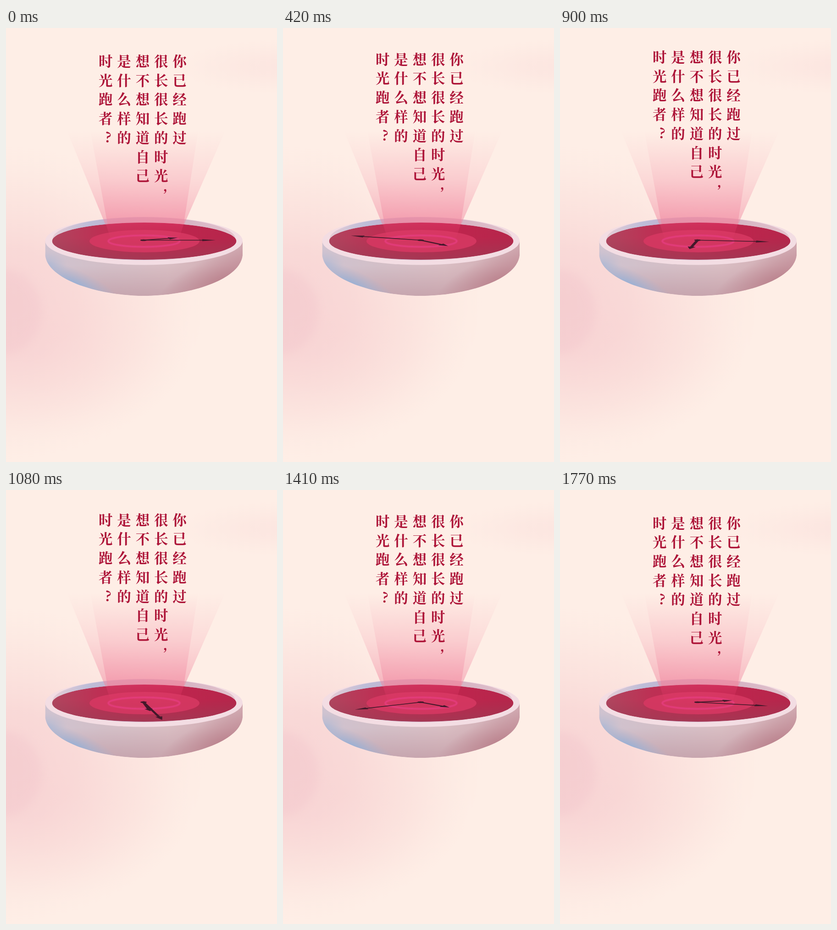
Recreate the animation shown at these times as an HTML page. Size 591 px wide and 948 px high, loop 1.8 s.

```html
<!DOCTYPE html>
<html lang="zh">
<head>
<meta charset="utf-8">
<style>
html, body { margin: 0; width: 100%; height: 100%; overflow: hidden; background: #feeee6; }
svg { display: block; width: 591px; height: 948px; }
text { font: 700 30.5px "Noto Serif CJK SC", "Noto Sans CJK SC", "Noto Sans CJK", serif; fill: #ad1438; text-anchor: middle; }
</style>
</head>
<body>
<svg viewBox="0 0 591 948">
  <defs>
    <radialGradient id="haze">
      <stop offset="0" stop-color="#f6cdd0" stop-opacity=".85"/>
      <stop offset=".35" stop-color="#f7d0d1" stop-opacity=".68"/>
      <stop offset=".7" stop-color="#f9d8d6" stop-opacity=".36"/>
      <stop offset="1" stop-color="#fbe2dd" stop-opacity="0"/>
    </radialGradient>
    <linearGradient id="body">
      <stop offset="0" stop-color="#cfc3d0"/>
      <stop offset=".3" stop-color="#d3bfc7"/>
      <stop offset=".62" stop-color="#d9bec3"/>
      <stop offset="1" stop-color="#cfa6ae"/>
    </linearGradient>
    <linearGradient id="under" x2="0" y2="1">
      <stop offset=".45" stop-color="#b88c98" stop-opacity="0"/>
      <stop offset="1" stop-color="#b88c98" stop-opacity=".5"/>
    </linearGradient>
    <radialGradient id="blue">
      <stop offset="0" stop-color="#93b0d8"/>
      <stop offset="1" stop-color="#a5b4d2" stop-opacity="0"/>
    </radialGradient>
    <radialGradient id="dusk">
      <stop offset="0" stop-color="#b57682" stop-opacity=".7"/>
      <stop offset="1" stop-color="#b57682" stop-opacity="0"/>
    </radialGradient>
    <linearGradient id="wall">
      <stop offset="0" stop-color="#e6cdd6"/>
      <stop offset=".2" stop-color="#bdbdd8"/>
      <stop offset=".4" stop-color="#c5b0ca"/>
      <stop offset=".7" stop-color="#d5b3c3"/>
      <stop offset="1" stop-color="#e3c3cd"/>
    </linearGradient>
    <linearGradient id="disc">
      <stop offset="0" stop-color="#b0465f"/>
      <stop offset=".25" stop-color="#bd3054"/>
      <stop offset=".6" stop-color="#c1254e"/>
      <stop offset="1" stop-color="#b5264b"/>
    </linearGradient>
    <linearGradient id="shade" x2="0" y2="1">
      <stop offset=".4" stop-color="#963f55" stop-opacity="0"/>
      <stop offset="1" stop-color="#963f55" stop-opacity=".65"/>
    </linearGradient>
    <linearGradient id="beam" gradientUnits="userSpaceOnUse" x1="0" y1="225" x2="0" y2="432">
      <stop offset="0" stop-color="#f7a9b5" stop-opacity="0"/>
      <stop offset=".5" stop-color="#f59fb0" stop-opacity=".24"/>
      <stop offset="1" stop-color="#f0849d" stop-opacity=".54"/>
    </linearGradient>
    <linearGradient id="pool" gradientUnits="userSpaceOnUse" x1="0" y1="420" x2="0" y2="470">
      <stop offset="0" stop-color="#e53c6c" stop-opacity=".5"/>
      <stop offset="1" stop-color="#e53c6c" stop-opacity="0"/>
    </linearGradient>
    <clipPath id="bowl"><path id="shell" d="M85.500 466V497C92 550 203 585 301 585S510 550 516 497V466Z"/></clipPath>
    <clipPath id="dial"><ellipse id="face" cx="301.500" cy="465.500" rx="201" ry="40.500"/></clipPath>
    <filter id="soft" x="-20%" y="-60%" width="140%" height="220%"><feGaussianBlur stdDeviation="1.2"/></filter>
    <filter id="blur" x="-50%" y="-50%" width="200%" height="200%"><feGaussianBlur stdDeviation="9"/></filter>
  </defs>

  <rect width="591" height="948" fill="#feeee6"/>
  <ellipse cx="0" cy="600" rx="440" ry="345" fill="url(#haze)"/>
  <ellipse cx="70" cy="715" rx="330" ry="185" fill="url(#haze)" opacity=".35"/>
  <ellipse cx="-5" cy="620" rx="82" ry="92" fill="#f3c8cd" opacity=".45" filter="url(#blur)"/>
  <ellipse cx="610" cy="85" rx="250" ry="62" fill="url(#haze)" opacity=".3"/>

  <g clip-path="url(#bowl)">
    <use href="#shell" fill="url(#body)"/>
    <use href="#shell" fill="url(#under)"/>
    <ellipse cx="150" cy="562" rx="115" ry="34" fill="url(#blue)" transform="rotate(24 150 562)"/>
    <ellipse cx="88" cy="518" rx="45" ry="32" fill="url(#blue)" opacity=".5"/>
    <ellipse cx="470" cy="552" rx="150" ry="56" fill="url(#dusk)" transform="rotate(-22 470 552)"/>
  </g>
  <ellipse cx="300.750" cy="465" rx="215.250" ry="52.500" fill="#f3dde3"/>
  <ellipse cx="301" cy="460" rx="199" ry="47" fill="url(#wall)"/>
  <path d="M133 225L217 430H388L478 225Z" fill="url(#beam)"/>
  <path d="M184 225L222 432H387L419 225Z" fill="url(#beam)"/>

  <g clip-path="url(#dial)">
    <use href="#face" fill="url(#disc)"/>
    <use href="#face" fill="url(#shade)"/>
    <ellipse cx="302" cy="465.500" rx="120" ry="24.500" fill="#d63862" opacity=".88"/>
    <path d="M216 422L228 460Q301 482 377 460L390 422Z" fill="url(#pool)"/>
    <ellipse cx="301" cy="465.500" rx="78" ry="12.500" fill="none" stroke="#e73d82" stroke-width="3" filter="url(#soft)"/>
  </g>

  <g transform="translate(300 463.500) scale(1 .255)" fill="#43182a">
    <circle r="7"/>
    <path id="long" d="M-7-3H128V-8L157 0 128 8V3H-7Z"/>
    <path id="short" d="M-6-3.500H57V-9L78 0 57 9V3.500H-6Z"/>
  </g>
  <g id="words"></g>
</svg>
<script>
const get = id => document.getElementById(id);
const [words, long, short] = ["words", "long", "short"].map(get);

function put(char, x, y) {
  const el = document.createElementNS("http://www.w3.org/2000/svg", "text");
  el.setAttribute("x", x);
  el.setAttribute("y", y);
  el.textContent = char;
  words.append(el);
}

["你已经跑过", "很长很长的时光", "想不想知道自己", "是什么样的", "时光跑者"].forEach((column, c) =>
  [...column].forEach((char, r) => put(char, 378.5 - c * 40.3, 84 + r * 41.7)));
put(",", 347, 356);
put("?", 223, 250);

// Angles are in degrees on the tilted dial, clockwise from the right.
function longAngle(f) {
  if (f < 30) return -355 * f / 30;
  return f < 45 ? 5 + 175 * (f - 30) / 15 : 12 * (60 - f);
}

function draw(now) {
  const frame = Math.floor(now % 1800 / 30);
  const swing = 1 - Math.abs(frame - 30) / 30;
  words.setAttribute("transform", `translate(0 ${-9 * swing})`);
  long.setAttribute("transform", `rotate(${longAngle(frame)})`);
  short.setAttribute("transform", `rotate(${-16 + 119 * swing})`);
}

const start = performance.now();
function tick() {
  draw(performance.now() - start);
  requestAnimationFrame(tick);
}
tick();
</script>
</body>
</html>
```
